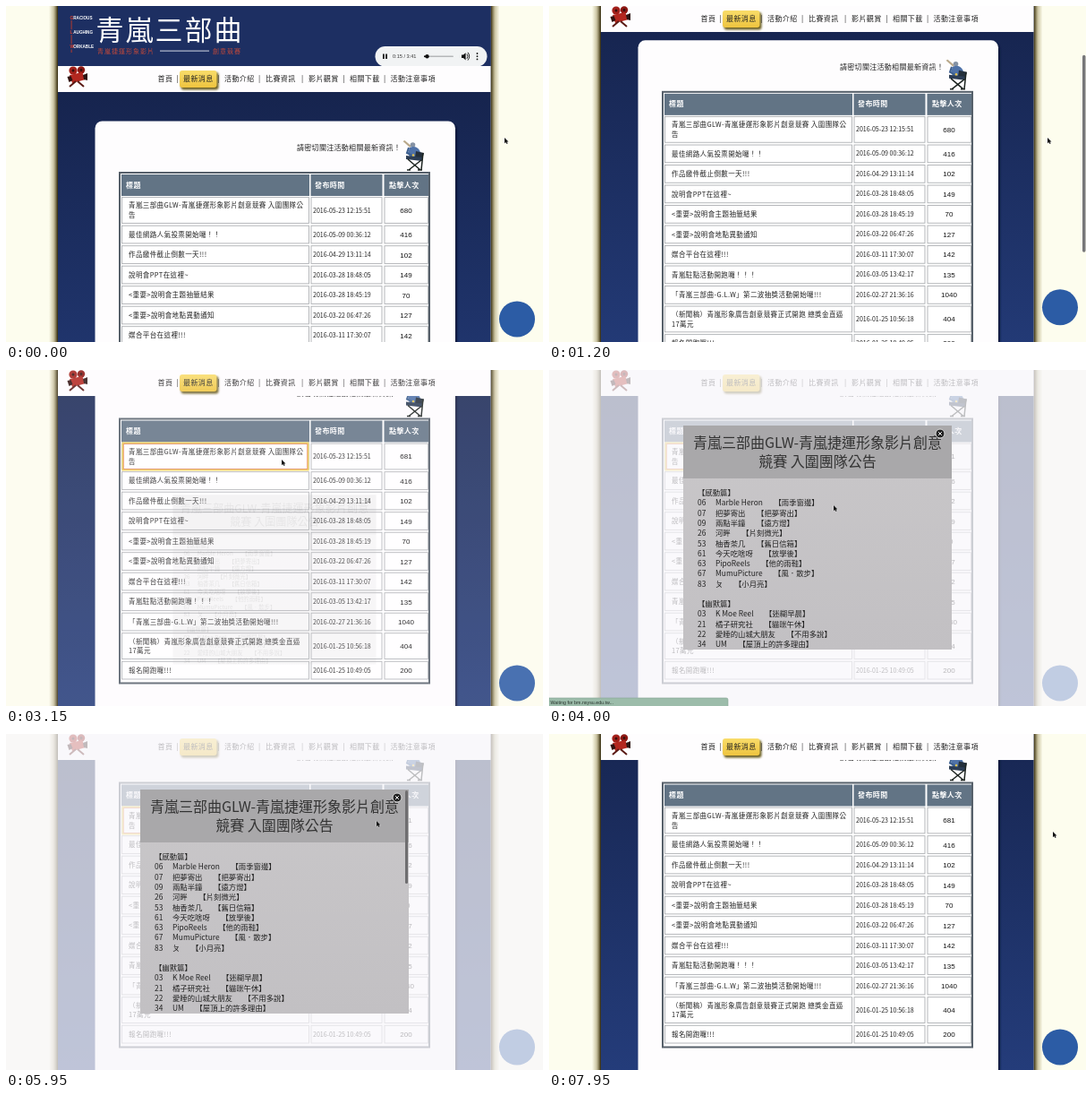
An HTML page for the animation above (8000 ms loop, 600 px wide and 375 px high).

```html
<!DOCTYPE html>
<html lang="zh-Hant">
<head>
<meta charset="utf-8">
<style>
  html, body { margin: 0; width: 100%; height: 100%; overflow: hidden; background: #fdfdee; }
  svg { display: block; width: 100vw; height: 100vh; }
  text { font-family: "Noto Sans CJK TC", "Noto Sans CJK", "Noto Sans", sans-serif; }
  .latin { font-family: "Liberation Sans", Arial, sans-serif; }
</style>
</head>
<body>
<svg id="stage" viewBox="0 0 600 375" xmlns="http://www.w3.org/2000/svg"></svg>
<script>
const LOOP = 8000;
const stage = document.getElementById('stage');

// Markup helpers; text is placed by its vertical centre.
const escapeText = s => s.replace(/&/g, '&amp;').replace(/</g, '&lt;');
const text = (x, y, s, size, fill = '#222', attrs = '') =>
  `<text x="${x}" y="${y + size * 0.37}" font-size="${size}" fill="${fill}" ${attrs}>${escapeText(s)}</text>`;
const rect = (x, y, w, h, fill, attrs = '') =>
  `<rect x="${x}" y="${y}" width="${w}" height="${h}" fill="${fill}" ${attrs}/>`;
const path = (d, fill, attrs = '') => `<path d="${d}" fill="${fill}" ${attrs}/>`;
const circle = (x, y, r, fill, attrs = '') => `<circle cx="${x}" cy="${y}" r="${r}" fill="${fill}" ${attrs}/>`;
const spaced = 'letter-spacing=".4"';
const middle = 'text-anchor="middle"';

const defs = `<defs>
  <linearGradient id="navy" gradientUnits="userSpaceOnUse" x1="0" y1="96" x2="0" y2="507">
    <stop offset="0" stop-color="#16244e"/><stop offset="1" stop-color="#243c7a"/></linearGradient>
  <linearGradient id="edge">
    <stop offset="0" stop-color="#8f8038" stop-opacity="0"/>
    <stop offset=".5" stop-color="#85763a" stop-opacity=".4"/>
    <stop offset="1" stop-color="#2b2205"/></linearGradient>
  <linearGradient id="button" x2="0" y2="1">
    <stop offset="0" stop-color="#f8dc6a"/><stop offset="1" stop-color="#eec43f"/></linearGradient>
  <linearGradient id="sheet" x2="0" y2="1">
    <stop offset="0" stop-color="#c9c7c9"/><stop offset="1" stop-color="#c2c0c3"/></linearGradient>
  <filter id="soft" x="-20%" y="-50%" width="140%" height="200%"><feGaussianBlur stdDeviation="1.2"/></filter>
  <clipPath id="sheetClip"><rect x="150" y="62" width="300" height="250"/></clipPath>
</defs>`;

const logo = () => {
  const words = ['GRACIOUS', 'LAUGHING', 'WORKABLE'].map((word, i) => {
    const y = 13 + i * 16.2;
    return rect(71, y - 3, 4, 6, '#1d2f62') +
      text(71.5, y, word[0], 5, '#d8412f', 'class="latin" font-weight="bold"') +
      text(75.3, y, word.slice(1), 4.6, '#fff', 'class="latin" font-weight="bold"');
  }).join('');
  return rect(72.6, 10, 1, 42, '#b03a30') + words +
    [...'青嵐三部曲'].map((c, i) => text(100.5 + i * 33, 27, c, 31, '#fff')).join('') +
    text(102, 50, '青嵐捷運形象影片', 7, '#c0483a', 'letter-spacing="1"') +
    rect(172, 49.6, 55, 1, '#d5d8e4') +
    text(231, 50, '創意競賽', 7, '#c0483a', 'letter-spacing="1"');
};

const player = () => rect(412.5, 45, 125, 22.5, '#f1f3f4', 'rx="11.2"') +
  rect(421, 53.5, 1.7, 5.5, '#111') + rect(424.2, 53.5, 1.7, 5.5, '#111') +
  text(432, 56.4, '0:15 / 3:41', 5.6, '#333', 'class="latin"') +
  rect(467, 55.5, 33, 1.6, '#b5b7b9', 'rx=".8"') + rect(467, 55.5, 4, 1.6, '#111') +
  circle(470.5, 56.3, 2.2, '#111') +
  path('M509 54.6h2l2.6-2.4v8.2l-2.6-2.4h-2z', '#111') +
  path('M515 53.6q2 2.6 0 5.2M516 51.8q3.4 4.4 0 8.8', 'none', 'stroke="#111" stroke-width=".9"') +
  [53, 56.2, 59.4].map(y => circle(526.5, y, 0.9, '#111')).join('');

const chair = () =>
  path('M443.5 151l2-1 7 6-1 2z', '#b9a88a') + circle(454.5, 155, 2.8, '#8592a4') +
  path('M451 158q7-3 11 3l3 7-13 2-3-6z', '#4f72a8') +
  path('M450 158l-2 6 6 3', 'none', 'stroke="#3c5f8f" stroke-width="2"') +
  path('M458 162l9 2-2 7-8-2z', '#24303c') +
  path('M447 167l19 2-1 4-18-2z', '#2c3d55') +
  circle(455, 166.5, 1.3, '#e5c24b') +
  path('M449 171l14 12M464 172l-14 11M466 164l-2 19M448 183h4M460 183h5', 'none',
    'stroke="#1d2420" stroke-width="1.5"');

const camera = () => circle(75, 72, 4.6, '#a3201a') + circle(84, 71.5, 4.2, '#8c1712') +
  circle(75, 72, 1.5, '#36100e') + circle(84, 71.5, 1.4, '#36100e') +
  path('M71 77l14-3 4 8-15 4z', '#b3271f') + path('M86 77l5-2v8l-4-1z', '#2d1513') +
  path('M78 84l-7 6M80 84l7 6', 'none', 'stroke="#5a1a15" stroke-width="2"') +
  path('M68.5 79l4-1 2 5-4 2z', '#30100e');

const news = [
  [['青嵐三部曲GLW-青嵐捷運形象影片創意競賽 入圍團隊公', '告'], '2016-05-23 12:15:51', '680'],
  [['最佳網路人氣投票開始囉！！'], '2016-05-09 00:36:12', '416'],
  [['作品繳件截止倒數一天!!!'], '2016-04-29 13:11:14', '102'],
  [['說明會PPT在這裡~'], '2016-03-28 18:48:05', '149'],
  [['<重要>說明會主題抽籤結果'], '2016-03-28 18:45:19', '70'],
  [['<重要>說明會地點異動通知'], '2016-03-22 06:47:26', '127'],
  [['媒合平台在這裡!!!'], '2016-03-11 17:30:07', '142'],
  [['青嵐駐點活動開跑囉！！！'], '2016-03-05 13:42:17', '135'],
  [['「青嵐三部曲-G.L.W」第二波抽獎活動開始囉!!!'], '2016-02-27 21:36:16', '1040'],
  [['（新聞稿）青嵐形象廣告創意競賽正式開跑 總獎金直逼', '17萬元'], '2016-01-25 10:56:18', '404'],
  [['報名開跑囉!!!'], '2016-01-25 10:49:05', '200']
];
const columns = [[129, 210, '標題', 134], [340.5, 80, '發布時間', 345], [422.5, 49.5, '點擊人次', 428]];

const table = () => {
  let out = rect(127, 186, 346, 295, '#fff', 'stroke="#56606a" stroke-width="2"') +
    columns.map(([x, w, label, tx]) => rect(x, 188, w, 24, '#627485') +
      text(tx, 199.7, label, 8, '#fff', `font-weight="bold" ${spaced}`)).join('');
  let top = 213.1;
  news.forEach(([lines, date, hits], i) => {
    const height = lines.length > 1 ? 29.8 : 20.7;
    const mid = top + height / 2;
    out += columns.map(([x, w]) =>
      rect(x + .5, top + .5, w - 1, height - 1, '#fff', 'stroke="#adb0b3" stroke-width=".9"')).join('');
    lines.forEach((line, k) => {
      out += text(137, mid + (k - (lines.length - 1) / 2) * 10.6, line, 7.5, '#222', spaced);
    });
    out += text(343, mid, date, 7, '#222') +
      text(447, mid, hits, 8, '#111', `class="latin" ${middle} ${i ? '' : 'id="hits"'}`);
    top += height + 1.8;
  });
  return out;
};

const hover = () => `<g id="hover">` +
  rect(130.5, 213, 207, 30, 'none', 'stroke="#f2d257" stroke-width="2"') +
  rect(131.5, 214, 205, 28, 'none', 'stroke="#d8392c" stroke-width=".9" stroke-dasharray="1 1"') + '</g>';

const nav = () => {
  const items = [[169.5, '首頁'], [198, '最新消息'], [244, '活動介紹'], [290, '比賽資訊'],
    [338, '影片觀賞'], [384, '相關下載'], [429.5, '活動注意事項']];
  return `<g id="nav">` + rect(58, 67, 483.5, 29, '#fefdfe') + camera() +
    rect(195.5, 74, 42, 19.5, '#6d6020', 'rx="3" filter="url(#soft)"') +
    rect(194, 72, 41.5, 19, 'url(#button)', 'rx="3"') +
    items.map(([x, label]) => text(x, 81.5, label, 8, '#222', spaced)).join('') +
    [191.5, 237.5, 283, 331, 377.5, 423].map(x => text(x, 81, '|', 8, '#222', middle)).join('') + '</g>';
};

const entries = [
  '【感動篇】', '06|Marble Heron|雨季窗邊', '07|把夢寄出|把夢寄出', '09|兩點半鐘|遠方燈', '26|河畔|片刻微光',
  '53|柚香茶几|舊日信箱', '61|今天吃啥呀|放學後', '63|PipoReels|他的雨鞋', '67|MumuPicture|風．散步', '83|ㄆ|小月亮', '',
  '【幽默篇】', '03|K Moe Reel|迷糊早晨', '21|橘子研究社|貓咪午休', '22|愛睡的山城大朋友|不用多說', '34|UM|屋頂上的許多理由',
  '45|晚風小隊|慢半拍', '52|三杯豆漿|出門以前', '58|紙飛機社|轉角笑聲', '70|木頭人|誰在偷看', '',
  '【實用篇】', '02|晴天工作室|五分鐘後', '11|小樹苗|輕鬆上路', '18|藍色水壺|早安路線', '29|慢慢走|週末地圖',
  '37|四格漫步|帶著雨傘', '48|海鹽餅乾|剛好到站', '55|夜貓隊|下一站見', '72|半糖少冰|一起出發'
];

const sheet = () => `<g id="modal">` + rect(150, 62, 300, 250, 'url(#sheet)') +
  `<g clip-path="url(#sheetClip)"><g id="list">` + rect(150, 62, 300, 59, '#a9a8aa') +
  text(300, 81.5, '青嵐三部曲GLW-青嵐捷運形象影片創意', 16, '#333', middle) +
  text(300, 102.5, '競賽 入圍團隊公告', 16, '#333', middle) +
  entries.map((entry, i) => {
    const y = 137 + i * 11.28;
    const [number, team, film] = entry.split('|');
    return text(166, y, number, 8.4, '#222') +
      (team ? text(186, y, `${team}\u3000\u3000【${film}】`, 8.4, '#222') : '');
  }).join('') + '</g>' + rect(446, 63, 3, 104, '#6f6e70', 'id="listBar" rx="1.5"') + '</g>' +
  circle(437, 71, 5, '#222', 'stroke="#ddd" stroke-width="1"') +
  path('M435.2 69.2l3.6 3.6M438.8 69.2l-3.6 3.6', 'none', 'stroke="#fff" stroke-width="1"') + '</g>';

stage.innerHTML = defs + rect(0, 0, 600, 375, '#fdfdee') +
  rect(48, 0, 10, 375, 'url(#edge)') +
  rect(0, 0, 10, 375, 'url(#edge)', 'transform="translate(551.5 0) scale(-1 1)"') +
  `<g id="page">` + rect(58, 0, 483.5, 640, 'url(#navy)') + rect(58, 0, 483.5, 67, '#1d2f62') +
  logo() + player() +
  rect(101, 130, 403, 510, '#0c1638', 'rx="9" filter="url(#soft)"') +
  rect(99.5, 128.5, 402.5, 510, '#fefdfe', 'rx="8"') +
  text(325, 158, '請密切關注活動相關最新資訊！', 8, '#222', 'letter-spacing=".3"') + chair() +
  table() + hover() + '</g>' + nav() +
  circle(571, 349.5, 20, '#2c5ca5', 'id="badge"') +
  rect(596, 0, 3.5, 220, '#77777a', 'id="pageBar" rx="1.7"') +
  rect(0, 0, 600, 375, '#f9f7fb', 'id="veil"') + sheet() +
  `<g id="status">` + rect(-2, 366, 202, 12, '#9cbcaa', 'rx="2" stroke="#87a594" stroke-width=".6"') +
  text(1.5, 370.7, 'Waiting for bm.nsysu.edu.tw...', 5.3, '#26332b', 'class="latin"') + '</g>' +
  path('M0 0V6.2L1.5 4.9 2.5 7.1 3.6 6.6 2.6 4.5H4.5Z', '#111',
    'id="cursor" stroke="#fff" stroke-width=".6" paint-order="stroke"');

const part = Object.fromEntries([...stage.querySelectorAll('[id]')].map(el => [el.id, el]));
const set = (id, name, value) => part[id].setAttribute(name, value);
const fade = (id, value) => set(id, 'opacity', value);
const shift = (id, x, y) => set(id, 'transform', `translate(${x} ${y})`);

const ramp = (t, from, to) => Math.min(1, Math.max(0, (t - from) / (to - from)));
const easeOut = u => u * (2 - u);
const smooth = u => u * u * (3 - 2 * u);

const cursorMoves = [
  [1850, 2550, 308, 100], [3350, 3850, 318, 151], [5650, 5930, 414, 97],
  [6000, 6350, 437, 70], [6700, 7400, 563, 109]
];
const cursorAt = t => cursorMoves.reduce(([x, y], [from, to, nx, ny]) => {
  const u = smooth(ramp(t, from, to));
  return [x + (nx - x) * u, y + (ny - y) * u];
}, [557, 147]);

function draw(t) {
  const scroll = 77 * smooth(ramp(t, 250, 850)) + 54.5 * easeOut(ramp(t, 1130, 1680));
  const anchor = 77 * smooth(ramp(t, 780, 1080)) + 54.5 * smooth(ramp(t, 1720, 2150));
  shift('page', 0, -scroll);
  shift('nav', 0, -Math.min(scroll, 67));
  shift('badge', 0, anchor - scroll);
  set('pageBar', 'y', 2 + scroll * 0.585);
  fade('pageBar', ramp(t, 230, 300) * (1 - ramp(t, 2150, 2400)));

  fade('hover', t > 2450 && t < 6750 ? 1 : 0);
  part.hits.textContent = t < 2950 ? '680' : '681';

  const open = ramp(t, 3050, 3580) * (1 - ramp(t, 6550, 7000));
  const scale = 0.7 + 0.3 * open;
  fade('veil', 0.73 * open);
  fade('modal', open ** 1.3);
  set('modal', 'transform', `translate(300 ${187 + 58 * (1 - open)}) scale(${scale}) translate(-300 -187)`);

  const listScroll = 180 * (smooth(ramp(t, 4500, 5000)) - smooth(ramp(t, 5250, 5650)));
  shift('list', 0, -listScroll);
  set('listBar', 'y', 63 + listScroll * 0.416);
  fade('listBar', ramp(t, 4450, 4520) * (1 - ramp(t, 6150, 6350)));
  fade('status', t > 3650 && t < 4600 ? 1 : 0);
  shift('cursor', ...cursorAt(t));
}

const start = performance.now();
function tick() {
  draw((performance.now() - start) % LOOP);
  requestAnimationFrame(tick);
}
tick();
</script>
</body>
</html>
```
